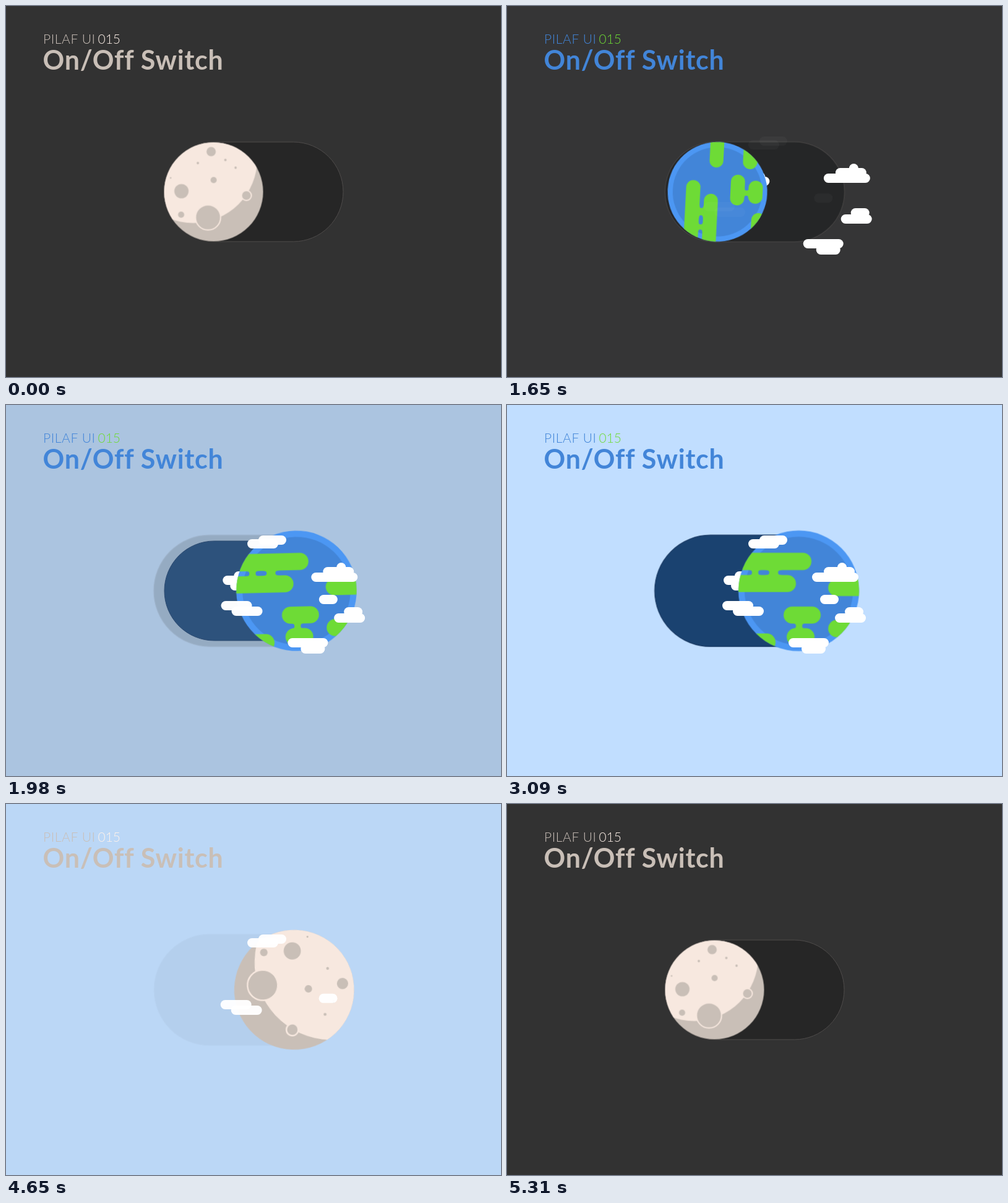
An HTML page that plays this animation: 800x600 px, repeating every 5.33 s.

```html
<!DOCTYPE html>
<html lang="en">
<head>
<meta charset="utf-8">
<title>On/Off Switch</title>
<style>
  :root {
    --loop: 5330ms;
    --stone: #c9bfb7;
    --cream: #f7e8df;
    --sea: #4285d8;
    --land: #6edb36;
  }
  html, body { margin: 0; width: 100%; height: 100%; overflow: hidden; }
  body { background: #323232; animation: sky var(--loop) ease infinite; }
  svg { display: block; width: 800px; height: 600px; }

  text { font-family: Lato, "Open Sans", sans-serif; }
  .label { font-size: 21px; font-weight: 300; }
  .title { font-size: 43px; font-weight: 700; letter-spacing: .75px; }
  .ink { animation: ink var(--loop) step-end infinite; }
  .number { animation: number var(--loop) step-end infinite; }

  .pill { transform-origin: 400.5px 300.5px; }
  .off { fill: #262626; stroke: #4f4c4b;
    animation: grow var(--loop) ease infinite, off-fade var(--loop) ease infinite; }
  .on { fill: #1a4270; stroke: #17365f;
    animation: on-size var(--loop) step-end infinite, on-fade var(--loop) ease infinite; }

  .ball { animation: roll var(--loop) ease infinite; }
  .day { animation: day var(--loop) step-end infinite; }
  .night { animation: night var(--loop) step-end infinite; }

  .cloud { fill: #fff; --d: 0px 0px; }
  .slide { animation: slide var(--loop) ease infinite; }
  .hard { animation: slide var(--loop) ease infinite, day var(--loop) step-end infinite; }
  .soft { animation: slide var(--loop) ease infinite, haze var(--loop) ease infinite; }

  /* on at 1630 ms, off at 4621 ms */
  @keyframes sky {
    0%, 30.582% { background: #323232; }
    42.589%, 86.698% { background: #c1deff; }
    96.079%, 100% { background: #323232; }
  }
  @keyframes ink {
    0% { fill: var(--stone); }
    30.582% { fill: var(--sea); }
    86.698%, 100% { fill: var(--stone); }
  }
  @keyframes number {
    0% { fill: #fff2ea; }
    30.582% { fill: var(--land); }
    86.698%, 100% { fill: #fff2ea; }
  }
  @keyframes grow {
    0%, 30.582% { scale: 1; }
    38.424%, 86.698% { scale: 1.12; }
    96.079%, 100% { scale: 1; }
  }
  @keyframes off-fade {
    0%, 30.582% { opacity: 1; }
    42.589%, 86.698% { opacity: 0; }
    96.079%, 100% { opacity: 1; }
  }
  @keyframes on-size {
    0% { scale: 1; }
    40.5%, 100% { scale: 1.12; }
  }
  @keyframes on-fade {
    0%, 30.582% { opacity: 0; }
    42.589%, 86.698% { opacity: 1; }
    86.699%, 100% { opacity: 0; }
  }
  @keyframes roll {
    0%, 30.582% { transform: translate(335.5px, 300.5px) scale(1) rotate(0deg); }
    38.424%, 86.698% { transform: translate(471.5px, 300.5px) scale(1.22) rotate(90deg); }
    96.079%, 100% { transform: translate(335.5px, 300.5px) scale(1) rotate(0deg); }
  }
  @keyframes day {
    0% { visibility: hidden; }
    30.582% { visibility: visible; }
    86.698%, 100% { visibility: hidden; }
  }
  @keyframes night {
    0% { visibility: visible; }
    30.582% { visibility: hidden; }
    86.698%, 100% { visibility: visible; }
  }
  @keyframes slide {
    0%, 30.582% { translate: var(--d); }
    38.424%, 86.698% { translate: 0px 0px; }
    96.079%, 100% { translate: var(--d); }
  }
  @keyframes haze {
    0%, 30.582% { fill-opacity: 0; }
    38.424%, 86.698% { fill-opacity: 1; }
    96.079%, 100% { fill-opacity: 0; }
  }
</style>
</head>
<body>
<svg viewBox="0 0 800 600">
  <defs>
    <clipPath id="moon-edge"><circle r="80"/></clipPath>
    <clipPath id="earth-edge"><circle r="97.5"/></clipPath>
    <path id="bridge" d="M-9-5V-4Q-5-4-5 0Q-5 4-9 4V5H9V4Q5 4 5 0Q5-4 9-4V-5Z"/>
  </defs>

  <text class="label ink" x="60" y="61" letter-spacing=".6">PILAF UI</text>
  <text class="label number" x="148.500" y="61">015</text>
  <text class="title ink" x="59.500" y="103">On/Off Switch</text>

  <rect class="pill off" x="256" y="220" width="289" height="161" rx="80.500"/>
  <rect class="pill on" x="256" y="220" width="289" height="161" rx="80.500"/>

  <g class="cloud hard" style="--d: 20px 0px">
    <rect x="350" y="276" width="55" height="15" rx="7.500"/>
    <rect x="368" y="269" width="30" height="15" rx="7.500"/>
    <rect x="362" y="285" width="33" height="15" rx="7.500"/>
  </g>

  <g class="ball">
    <g class="night">
      <circle r="80" fill="#c9bfb7"/>
      <circle cx="-33" cy="-53" r="103.500" fill="#f7e8df" clip-path="url(#moon-edge)"/>
      <g fill="#c9bfb7">
        <g stroke="#f7e8df" stroke-width="2">
          <circle cx="-9" cy="41.500" r="20.300"/>
          <circle cx="53" cy="6" r="8"/>
        </g>
        <circle cx="-4" cy="-65" r="7.500"/>
        <circle cx="-52" cy="-1" r="11.500"/>
        <circle cx="-52.500" cy="37" r="5"/>
        <circle cy="-19" r="5"/>
        <circle cx="-25.500" cy="-46.500" r="1.900"/>
        <circle cx="19" cy="-51.500" r="1.900"/>
        <circle cx="35.500" cy="-39" r="1.900"/>
        <circle cx="-69.500" cy="-22.500" r="1.300"/>
      </g>
    </g>

    <g class="day" transform="rotate(-90) scale(.82)">
      <circle r="97.500" fill="#4c97f3"/>
      <circle r="87.500" fill="#4285d8"/>
      <g fill="#6edb36" clip-path="url(#earth-edge)">
        <rect x="-120" y="-61.500" width="140.500" height="28" rx="14"/>
        <rect x="-120" y="-25.500" width="115.500" height="27.500" rx="13.750"/>
        <use href="#bridge" x="-70.500" y="-29.500"/>
        <use href="#bridge" transform="translate(-40.500 -29.500) scale(1.400 1)"/>
        <rect x="-24.500" y="25.500" width="60" height="27.500" rx="13.750"/>
        <use href="#bridge" x=".5" y="57"/>
        <rect x="-19.500" y="60.500" width="45" height="28" rx="14"/>
        <rect x="47.500" y="-18.500" width="80" height="27" rx="13.500"/>
        <rect x="47.500" y="47" width="80" height="28" rx="14"/>
        <rect x="-120" y="69" width="82.500" height="28" rx="14"/>
      </g>
    </g>
  </g>

  <g class="cloud soft">
    <rect x="408" y="211" width="45" height="15" rx="7.500"/>
    <rect x="390" y="217" width="50" height="15" rx="7.500"/>
  </g>
  <g class="cloud soft" style="--d: -31px 0px">
    <rect x="348" y="317" width="50" height="15" rx="7.500"/>
    <rect x="365" y="326" width="50" height="15" rx="7.500"/>
  </g>
  <g class="cloud soft" style="--d: -10px -4px">
    <rect x="506" y="307" width="30" height="15" rx="7.500"/>
  </g>
  <g class="cloud hard" style="--d: 19.5px 0px">
    <rect x="493" y="271" width="75" height="15" rx="7.500"/>
    <rect x="512" y="262" width="50" height="15" rx="7.500"/>
    <circle cx="541.500" cy="262.500" r="7.500"/>
  </g>
  <g class="cloud hard" style="--d: 10px 0px">
    <rect x="530" y="337" width="50" height="15" rx="7.500"/>
    <rect x="546" y="327" width="30" height="15" rx="7.500"/>
  </g>
  <g class="cloud hard" style="--d: 24.5px 0px">
    <rect x="455" y="377" width="65" height="15" rx="7.500"/>
    <rect x="476" y="387" width="39" height="15" rx="7.500"/>
  </g>
</svg>
</body>
</html>
```
